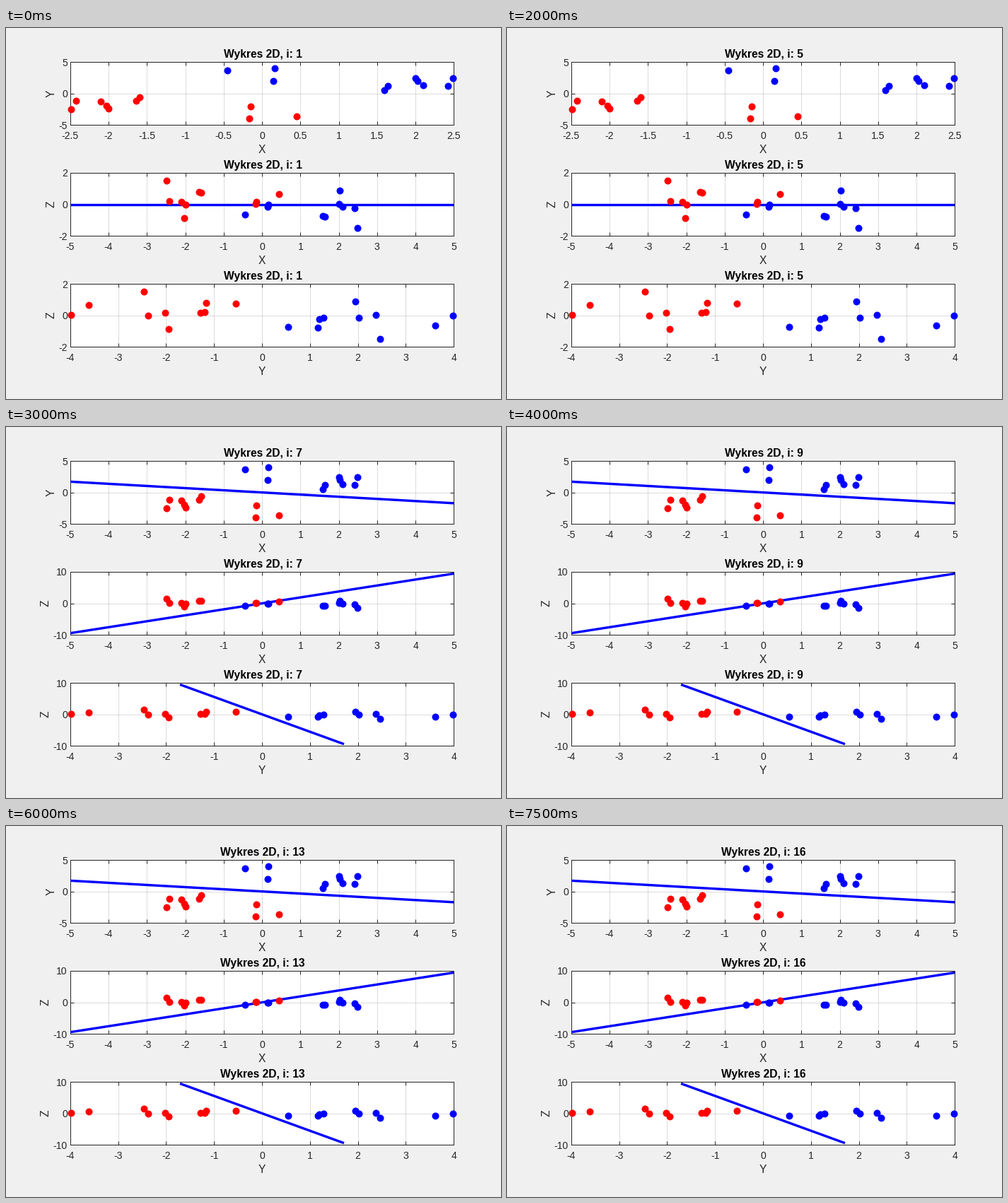
Write a matplotlib script that moves like this. It is 700 px wide and 525 px high and loops after 8000 ms.

```python
import numpy as np
import matplotlib.pyplot as plt
from matplotlib.animation import FuncAnimation

PX = 0.72  # points per pixel at 100 dpi
W, H = 700, 525
PANEL_W, PANEL_H = 542.5, 89.2
DARK = "#262626"

plt.rcParams.update({
    "font.family": "Liberation Sans",
    "axes.unicode_minus": False,
    "axes.linewidth": PX,
    "axes.edgecolor": DARK,
    "axes.axisbelow": True,
    "axes.titlesize": 15.6 * PX,
    "axes.titleweight": "bold",
    "axes.labelsize": 15.6 * PX,
    "axes.labelcolor": DARK,
})

# One class of points (x, y, z); the other is its mirror through the origin.
BLUE = np.array([
    (-0.45, 3.61, -0.66), (0.17, 3.98, -0.03), (0.15, 2.02, -0.14),
    (1.59, 0.55, -0.73), (1.64, 1.17, -0.80), (2.00, 2.38, 0.03),
    (2.03, 1.95, 0.88), (2.10, 1.28, -0.17), (2.42, 1.20, -0.22),
    (2.49, 2.46, -1.51),
])
RED = -BLUE
PANELS = [(0, 1), (0, 2), (1, 2)]

fig = plt.figure(figsize=(W / 100, H / 100), dpi=100, facecolor="#f0f0f0")
axes = [fig.add_axes([90.75 / W, 1 - (137.2 + 157 * k) / H, PANEL_W / W, PANEL_H / H])
        for k in range(3)]


def boundary(step):
    """End points of the separating line, y and z being linear in x."""
    x = np.array([-5, 5])
    if step < 6:
        y, z = np.nan * x, 0 * x
    elif step == 6:
        y, z = -6.61 - 0.838 * x, 14.5 + 1.82 * x
    else:
        y, z = -0.342 * x, 1.89 * x
    return np.column_stack([x, y, z])


def fit_axis(axis, values, max_intervals, tight_off_centre=False):
    """Round limits out to a nice step, and put ticks on its multiples."""
    low, high = values.min(), values.max()
    step = next(s for s in (0.5, 1, 2, 5, 10) if (high - low) / s <= max_intervals)
    if not (tight_off_centre and abs(low + high) > 1e-6):
        low, high = step * np.floor(low / step), step * np.ceil(high / step)
    ticks = step * np.arange(np.ceil(low / step), np.floor(high / step) + 1)
    axis.set_ticks(ticks, [f"{t + 0:g}" for t in ticks])
    return low, high


def draw_panel(ax, dims, line, title):
    ax.cla()
    line = line[:, dims]
    line = line[~np.isnan(line).any(axis=1)]
    ax.plot(*line.T, color="blue", lw=3.4 * PX, solid_capstyle="butt", zorder=3)
    for points, color in ((BLUE, "blue"), (RED, "red")):
        ax.plot(*points[:, dims].T, "o", color=color, ms=10 * PX, mew=0,
                clip_on=False, zorder=4)

    shown = np.vstack([line, BLUE[:, dims], RED[:, dims]])
    xlim = fit_axis(ax.xaxis, shown[:, 0], 10)
    ylim = fit_axis(ax.yaxis, shown[:, 1], 3, tight_off_centre=True)
    ax.set(xlim=xlim, ylim=ylim)

    ax.tick_params(direction="in", top=True, right=True, length=5 * PX,
                   width=PX, color=DARK, labelcolor=DARK, labelsize=14 * PX)
    ax.tick_params(axis="x", pad=8.6 * PX)
    ax.tick_params(axis="y", pad=4 * PX)
    ax.grid(color=DARK, alpha=0.16, lw=PX)
    ax.set_title(title, x=0.502, pad=6 * PX)
    ax.set_xlabel("XYZ"[dims[0]])
    ax.xaxis.set_label_coords(0.5, -28 / PANEL_H)
    ax.set_ylabel("XYZ"[dims[1]], labelpad=3 * PX)


def update(i):
    step = i + 1
    for ax, dims in zip(axes, PANELS):
        draw_panel(ax, dims, boundary(step), f"Wykres 2D, i: {step}")
    return []


anim = FuncAnimation(fig, update, frames=16, interval=500, repeat=True,
                     repeat_delay=0, init_func=lambda: [], blit=False)
plt.show()
```
